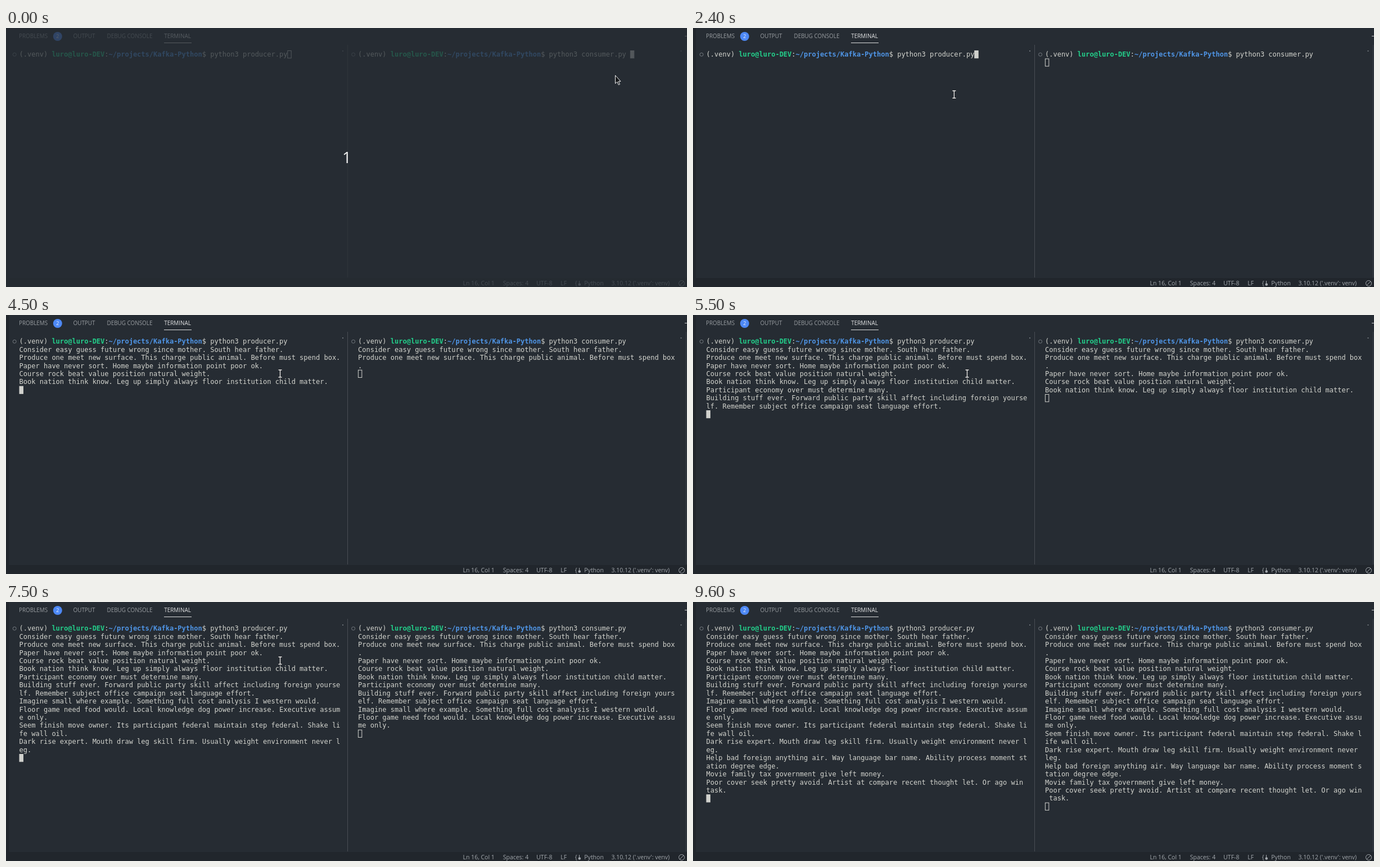
Recreate the animation shown at these times as an HTML page. Size 1211 by 462 pixels, loop 10000 ms.

```html
<!DOCTYPE html>
<html lang="en">
<head>
<meta charset="utf-8">
<title>Producer and consumer terminals</title>
<style>
  html, body { margin: 0; width: 100%; height: 100%; overflow: hidden; background: #262c33; }
  svg { display: block; width: 1211px; height: 462px; }
  text { white-space: pre; }
  .ui { font-family: "Open Sans", "Noto Sans", sans-serif; }
  .tab { font-size: 9.9px; fill: #9a9ea2; }
  .status { font-size: 10.5px; fill: #a3a8ad; }
  .term { font: 12px "DejaVu Sans Mono", monospace; fill: #d3d4ce; }
  .user { font-weight: bold; fill: #23ce8a; }
  .path { font-weight: bold; fill: #4f95e6; }
</style>
</head>
<body>
<svg id="stage" viewBox="0 0 1211 462">
  <rect width="1211" height="462" fill="#262c33"/>
  <rect width="5" height="462" fill="#21262c"/>
  <rect y="446" width="1211" height="16" fill="#21262c"/>
  <rect x="607" y="30" width="1" height="415" fill="#484d53"/>
  <rect x="1209" y="30" width="1" height="415" fill="#3c4248"/>
  <rect x="1207" y="14" width="4" height="1" fill="#c8cacc"/>
  <g class="ui tab">
    <text x="23" y="18">PROBLEMS</text>
    <text x="119.5" y="18">OUTPUT</text>
    <text x="179.5" y="18">DEBUG CONSOLE</text>
    <text x="281.3" y="18" fill="#e4e5e6">TERMINAL</text>
    <rect x="281" y="26" width="49" height="1" fill="#dcdddd"/>
    <circle cx="91.8" cy="15" r="8" fill="#4d88f5"/>
    <text x="91.8" y="18.3" font-size="9" fill="#e8eefa" text-anchor="middle">2</text>
  </g>
  <g class="ui status">
    <text x="812.5" y="459">Ln 16, Col 1</text>
    <text x="883.7" y="459">Spaces: 4</text>
    <text x="943.2" y="459">UTF-8</text>
    <text x="986.3" y="459">LF</text>
    <text x="1011.8" y="459">{</text>
    <path d="M1019.5 451v6" stroke="#a3a8ad"/>
    <circle cx="1019.8" cy="457.5" r="2.3"/>
    <text x="1028.3" y="459">Python</text>
    <text x="1076.5" y="459">3.10.12 ('.venv': venv)</text>
    <g fill="none" stroke="#a3a8ad">
      <circle cx="1201.5" cy="455.5" r="5"/>
      <path d="M1198 459l7-7"/>
    </g>
  </g>
  <g id="panes"></g>
  <g id="countdown">
    <rect width="1211" height="462" fill="#272d34" opacity=".74"/>
    <text class="ui" x="606" y="241.3" font-size="28" fill="#f2f3f3" text-anchor="middle">1</text>
  </g>
  <path id="arrow" d="M1083.5 84.5v14.5l3.4-3 2.4 5.4 2.2-1-2.4-5.2h4z" fill="#15181b" stroke="#f4f4f4"/>
  <g id="beam" fill="none">
    <path d="M-3-6.5H3M-3 6.5H3M0-6.5V6.5" stroke="#14171a" stroke-width="3"/>
    <path d="M-3-6.5H3M-3 6.5H3M0-6.5V6.5" stroke="#f4f4f4" stroke-width="1.4"/>
  </g>
</svg>
<script>
const LOOP = 10000, STEP = 100;
const CHAR = 7.224, LINE = 14.44, TOP = 40, BASE = 51.2;
const $ = id => document.getElementById(id);

const messages = [
  "Consider easy guess future wrong since mother. South hear father.",
  "Produce one meet new surface. This charge public animal. Before must spend box.",
  "Paper have never sort. Home maybe information point poor ok.",
  "Course rock beat value position natural weight.",
  "Book nation think know. Leg up simply always floor institution child matter.",
  "Participant economy over must determine many.",
  "Building stuff ever. Forward public party skill affect including foreign yourself. Remember subject office campaign seat language effort.",
  "Imagine small where example. Something full cost analysis I western would.",
  "Floor game need food would. Local knowledge dog power increase. Executive assume only.",
  "Seem finish move owner. Its participant federal maintain step federal. Shake life wall oil.",
  "Dark rise expert. Mouth draw leg skill firm. Usually weight environment never leg.",
  "Help bad foreign anything air. Way language bar name. Ability process moment station degree edge.",
  "Movie family tax government give left money.",
  "Poor cover seek pretty avoid. Artist at compare recent thought let. Or ago win task."
];
// Messages printed after each one-second batch, the first at 3500 ms.
const batches = [2, 5, 7, 9, 11, 13, 14];

const panes = [
  { x: 23.6, cols: 79, script: "producer.py", promptCols: 66, enter: 3300, delay: 0,
    mark: 598, focused: t => t >= 2400 },
  { x: 626, cols: 78, script: "consumer.py ", promptCols: 67, enter: 1300, delay: 100,
    mark: 1199.5, focused: t => t < 2300 }
];

// Pointer keys: time, x, y
const pointer = [
  [400, 1083.6, 86.2], [600, 1084.4, 85.4], [1500, 1084.4, 85.4],
  [1600, 1040, 92], [1800, 740, 122], [2000, 482, 128], [2100, 464.4, 118.5],
  [2500, 464.4, 118.5], [2700, 468, 115.2], [2900, 473.4, 117],
  [3400, 473.4, 117], [3600, 487.5, 104.5],
  [8600, 487.5, 104.5], [8900, 502, 66]
];

function pointerAt(t) {
  const next = pointer.findIndex(key => key[0] > t);
  if (next === 0) return pointer[0].slice(1);
  if (next < 0) return pointer[pointer.length - 1].slice(1);
  const [t0, x0, y0] = pointer[next - 1], [t1, x1, y1] = pointer[next];
  const k = (t - t0) / (t1 - t0);
  return [x0 + (x1 - x0) * k, y0 + (y1 - y0) * k];
}

const wrap = (text, cols) => text.match(new RegExp(`.{1,${cols}}`, "g"));

function buildPane(p) {
  p.rows = messages.map(m => wrap(m, p.cols));
  const g = document.createElementNS("http://www.w3.org/2000/svg", "g");
  g.innerHTML = `
    <circle cx="${p.x - 8.4}" cy="47.3" r="3" fill="none" stroke="#747a80"/>
    <rect x="${p.mark}" y="40" width="2" height="2" fill="#6a7076"/>
    <text class="term" x="${p.x}" y="${BASE}">(.venv) <tspan class="user">luro@luro-DEV</tspan>:<tspan
      class="path">~/projects/Kafka-Python</tspan>$ python3 ${p.script}</text>
    <g class="term"></g>
    <rect width="6.4" height="13.2" stroke="#d0d1cd"/>`;
  p.output = g.querySelector("g");
  p.caret = g.lastElementChild;
  $("panes").append(g);
}

function drawPane(p, t) {
  const batch = Math.floor((t - p.delay - 3500) / 1000);
  const lines = batch < 0 ? [] : p.rows.slice(0, batches[batch]).flat();
  p.output.innerHTML = lines.map((line, i) =>
    `<text x="${p.x}" y="${BASE + LINE * (i + 1)}">${line}</text>`).join("");
  const entered = t >= p.enter;
  p.caret.setAttribute("x", p.x + 0.4 + (entered ? 0 : p.promptCols * CHAR));
  p.caret.setAttribute("y", TOP + 0.5 + (entered ? LINE * (lines.length + 1) : 0));
  p.caret.setAttribute("fill", p.focused(t) ? "#d0d1cd" : "none");
}

const show = (id, on) => $(id).setAttribute("visibility", on ? "visible" : "hidden");

function draw(t) {
  panes.forEach(p => drawPane(p, t));
  show("countdown", t < 100);
  show("arrow", t < 100);
  show("beam", t >= 100 && t < 9000);
  $("beam").setAttribute("transform", `translate(${pointerAt(t)})`);
}

let shown = -1;
const start = performance.now();
function tick() {
  const elapsed = (performance.now() - start) % LOOP;
  const t = Math.floor(elapsed / STEP) * STEP;
  if (t !== shown) draw(shown = t);
  requestAnimationFrame(tick);
}

panes.forEach(buildPane);
tick();
</script>
</body>
</html>
```
